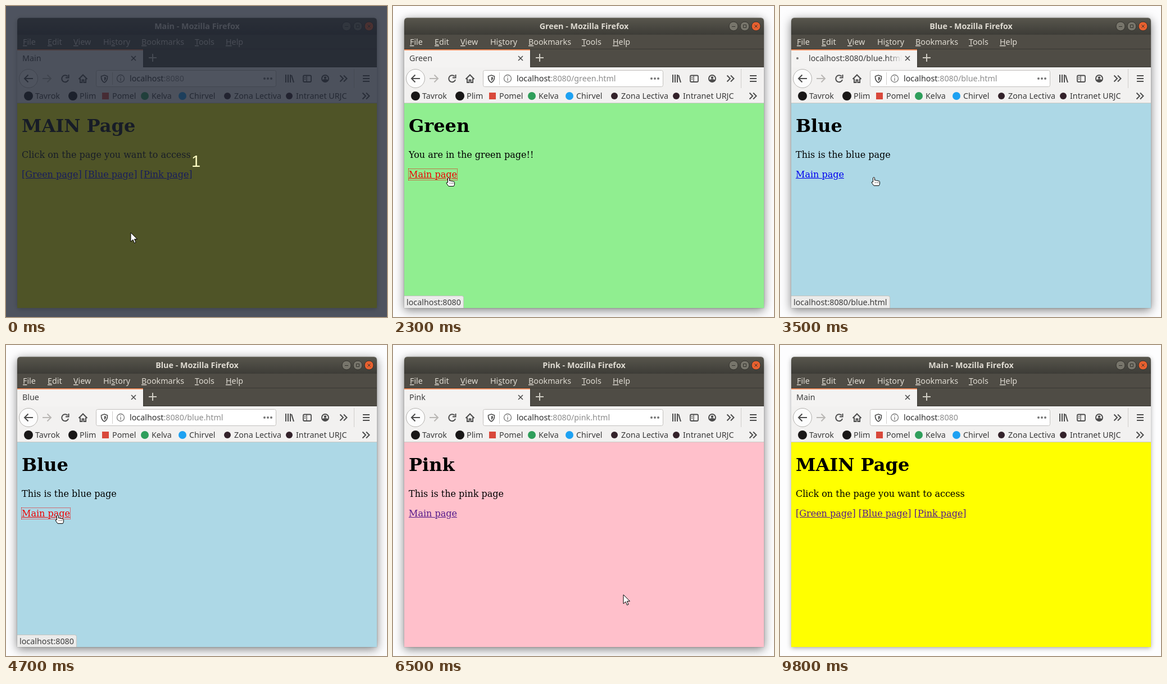
An HTML page for the animation above (9900 ms loop, 678 by 553 pixels).

```html
<!DOCTYPE html>
<html lang="en">
<head>
<meta charset="utf-8">
<title>Browser demo</title>
<style>
html, body { margin: 0; width: 100%; height: 100%; overflow: hidden; }
#stage { position: relative; width: 678px; height: 553px; overflow: hidden; background: #fdfdfe; }
#stage > * { position: absolute; }
#shadow { left: 20px; top: 21px; width: 640px; height: 516px; border-radius: 6px 6px 0 0;
  box-shadow: 0 4px 17px rgba(0,0,0,.5), 0 0 2px rgba(0,0,0,.35); }
#shadow.idle { box-shadow: 0 2px 8px rgba(0,0,0,.32), 0 0 1px rgba(0,0,0,.3); }
svg { left: 0; top: 0; }
svg text, #status { font: 14.3px "Noto Sans", "Open Sans", sans-serif; white-space: pre; }
#menu text { fill: #dfdbd2; }
#menu tspan { text-decoration: underline; }
#marks text { fill: #3a3a3a; }
#page { left: 20px; top: 173px; width: 640px; height: 364px; color: #000;
  font: 16px/19px "DejaVu Serif", serif; }
#page > * { position: absolute; left: 8px; margin: 0; white-space: pre; }
#page h1 { top: 22px; font: bold 32px/37px "DejaVu Serif", serif; }
#page .text { top: 82px; }
#page .links { top: 117px; }
a { color: #0000ee; text-decoration: underline; }
a.visited { color: #551a8b; }
a.active { color: #ee0000; outline: 1px dotted #ee0000; }
#status { left: 20px; top: 515px; height: 21px; line-height: 22px; padding: 0 4px;
  background: #ebebea; color: #3c3c3c; border: solid #c4c4c0; border-width: 1px 1px 0 0;
  border-radius: 0 4px 0 0; }
#dim { inset: 0; background: rgba(30,36,50,.78); }
#count { left: 330px; top: 260px; font: 29px/33px "Liberation Sans", Arial, sans-serif; color: #ffffc4; }
</style>
</head>
<body>
<div id="stage">
  <div id="shadow"></div>
  <svg width="678" height="553" viewBox="0 0 678 553">
    <defs>
      <linearGradient id="bar" x2="0" y2="1"><stop stop-color="#58564d"/><stop offset="1" stop-color="#3d3c37"/></linearGradient>
      <linearGradient id="fade"><stop stop-color="#f4f3f2" stop-opacity="0"/><stop offset="1" stop-color="#f4f3f2"/></linearGradient>
      <clipPath id="tabClip"><rect x="20" y="79" width="224" height="30"/></clipPath>
      <clipPath id="labelClip"><rect x="20" y="79" width="197" height="30"/></clipPath>
    </defs>
    <path d="M20 51V27q0-6 6-6H654q6 0 6 6V51Z" fill="url(#bar)"/>
    <path d="M26 21.5H654" stroke="#6a685e"/>
    <rect x="20" y="51" width="640" height="58" fill="#4f4c45"/>
    <path d="M20 76.5H660M244.500 77V109M244 108.500H660" stroke="#3a3833"/>
    <text id="title" x="340" y="41" text-anchor="middle" fill="#dfdbd2" style="font-weight:bold"></text>

    <g stroke="#33322d">
      <circle cx="606" cy="36" r="8" fill="#77756b"/>
      <circle cx="626" cy="36" r="8" fill="#77756b"/>
      <circle cx="646" cy="36" r="8" fill="#e8602f"/>
      <path d="M603 36.500H609M623.500 33.500H628.500V38.500H623.500ZM643.500 33.500L648.500 38.500M648.500 33.500L643.500 38.500" fill="none"/>
    </g>

    <g id="menu">
      <text x="30" y="69"><tspan>F</tspan>ile</text>
      <text x="74" y="69"><tspan>E</tspan>dit</text>
      <text x="120" y="69"><tspan>V</tspan>iew</text>
      <text x="173" y="69">Hi<tspan>s</tspan>tory</text>
      <text x="241" y="69"><tspan>B</tspan>ookmarks</text>
      <text x="336" y="69"><tspan>T</tspan>ools</text>
      <text x="391" y="69"><tspan>H</tspan>elp</text>
    </g>

    <rect x="20" y="77" width="224" height="32" fill="#f4f3f2"/>
    <rect x="20" y="77" width="224" height="2" fill="#ef8f5f"/>
    <circle id="burst" cx="28" cy="93" fill="#0a84ff" clip-path="url(#tabClip)"/>
    <circle id="dot" cx="31" cy="93" r="2" fill="#777"/>
    <g clip-path="url(#labelClip)"><text id="label" y="98" fill="#3c3c3c"></text></g>
    <rect id="labelFade" x="190" y="80" width="27" height="28" fill="url(#fade)"/>
    <path d="M223 89L231 97M231 89L223 97" stroke="#4a4a4a" stroke-width="1.6"/>
    <path d="M254 92H268M261 85V99" stroke="#cfccc3" stroke-width="2"/>

    <rect x="20" y="109" width="640" height="64" fill="#f2f1f0"/>
    <path d="M20 172.500H660" stroke="#c9c8c4"/>
    <circle cx="40" cy="129" r="16.500" fill="#fcfcfc" stroke="#b3b1ae"/>
    <rect x="160.500" y="114.500" width="320" height="29" rx="3" fill="#fff" stroke="#c2c0bd"/>
    <path d="M189.500 118V140M619.500 112V146" stroke="#d0cecb"/>
    <g fill="none" stroke="#4c4c4c" stroke-width="2">
      <path d="M48 129H33M39.500 122.500L33 129L39.500 135.500"/>
      <path d="M65 129H80M73.500 122.500L80 129L73.500 135.500" stroke="#b9b7b4"/>
      <path d="M109.500 125A6 6 0 1 0 111 131M111.500 122V127.500H106"/>
      <path d="M129.500 130L137 122.500L144.500 130M132 129V136H135.500V131.500H138.500V136H142V129"/>
      <path d="M175 123L180.500 125Q181 133 175 136Q169 133 169.500 125Z" stroke-width="1.600"/>
      <path d="M175 126V133Q178 131 178 127Z" fill="#4c4c4c" stroke="none"/>
      <g stroke="#777" stroke-width="1.300"><circle cx="204" cy="129" r="6.500"/><path d="M204 128V133M204 125V126.500"/></g>
      <path d="M498 122V136M502 122V136M506 122V136M508 123L512 136"/>
      <rect x="529" y="123.500" width="14" height="11.500" rx="2" stroke-width="1.800"/>
      <path d="M535 124V135M531 127H533M531 130H533" stroke-width="1.300"/>
      <circle cx="568" cy="129" r="6"/>
      <path d="M564 132Q568 130 572 132L568 135Z" fill="#4c4c4c"/>
      <circle cx="568" cy="127.500" r="2.200" fill="#4c4c4c" stroke="none"/>
      <path d="M594.500 123.500L600 129L594.500 134.500M601 123.500L606.500 129L601 134.500"/>
      <path d="M635 124H647M635 129H647M635 134H647"/>
      <path d="M634.500 154.500L640 160L634.500 165.500M641 154.500L646.500 160L641 165.500"/>
    </g>
    <g fill="#777"><circle cx="460" cy="129" r="2"/><circle cx="466" cy="129" r="2"/><circle cx="472" cy="129" r="2"/></g>
    <text x="220" y="134" fill="#2e2e2e">localhost<tspan id="path" fill="#8c8c8c"></tspan></text>

    <g id="marks">
      <circle cx="40" cy="160" r="8" fill="#191717"/><text x="52" y="165">Tavrok</text>
      <circle cx="119" cy="160" r="8" fill="#191717"/><text x="131" y="165">Plim</text>
      <rect x="171" y="154" width="12" height="12" fill="#d9483b"/><text x="189" y="165">Pomel</text>
      <circle cx="247" cy="160" r="7" fill="#2f9e5b"/><text x="259" y="165">Kelva</text>
      <circle cx="314" cy="160" r="7" fill="#1da1f2"/><text x="326" y="165">Chirvel</text>
      <circle cx="394" cy="160" r="6" fill="#33222a"/><text x="406" y="165">Zona Lectiva</text>
      <circle cx="504" cy="160" r="6" fill="#33222a"/><text x="516" y="165">Intranet URJC</text>
    </g>
  </svg>
  <div id="page"></div>
  <div id="status"></div>
  <div id="dim"></div>
  <div id="count">1</div>
  <svg width="678" height="553" viewBox="0 0 678 553">
    <g id="cursor" fill="#fff" stroke="#000" stroke-linejoin="round">
      <path id="arrow" d="M0 0V16L4 12.500L6.500 18.500L9 17.300L6.500 11.600H11.500Z"/>
      <g id="hand">
        <path d="M-1.500 9V1.500Q0-.5 1.500 1.500V6Q3 5 4.500 6.500Q6 5.500 7.500 7Q10 6.500 10.500 8.500V12Q10 14 9 15.500H0L-4 10Q-4 8-1.500 9Z"/>
        <path d="M2.500 9V11M5.500 9V11M8 9V11" stroke-width=".7"/>
      </g>
    </g>
  </svg>
</div>
<script>
const LOOP = 9900, STEP = 100;
const $ = id => document.getElementById(id);

const pages = {
  main: { name: 'Main', head: 'MAIN Page', text: 'Click on the page you want to access', color: '#ffff00', path: ':8080' },
  green: { name: 'Green', text: 'You are in the green page!!', color: '#90ee90' },
  blue: { name: 'Blue', text: 'This is the blue page', color: '#add8e6' },
  pink: { name: 'Pink', text: 'This is the pink page', color: '#ffc0cb' }
};
for (const id in pages) pages[id].path ??= `:8080/${id}.html`;

// Times below are in steps of 100 ms.
const visits = [
  { id: 'main', load: -9, ready: -9 },
  { id: 'green', load: 8, ready: 10, hover: 6, out: 9 },
  { id: 'main', load: 24, ready: 25, hover: 20, out: 25 },
  { id: 'blue', load: 35, ready: 36, hover: 31, out: 37 },
  { id: 'main', load: 48, ready: 49, hover: 44, out: 49 },
  { id: 'pink', load: 58, ready: 59, hover: 57, out: 60 },
  { id: 'main', load: 74, ready: 75, hover: 71, out: 75 }
];
const hands = [[6, 12], [20, 25], [31, 37], [44, 49], [56, 60], [71, 75]];
const track = [
  [0, 222, 403], [2, 222, 403], [3, 168, 366], [4, 168, 366], [6, 112, 306], [7, 111, 302],
  [10, 112, 300], [14, 150, 345], [20, 108, 309], [23, 99, 305], [28, 130, 330], [32, 175, 303],
  [35, 167, 304], [40, 130, 345], [44, 100, 306], [47, 92, 302], [51, 160, 330], [55, 250, 318],
  [57, 274, 297], [58, 275, 299], [64, 330, 390], [65, 410, 444], [66, 410, 444], [71, 105, 306],
  [73, 100, 301], [75, 137, 305], [77, 240, 336], [80, 492, 86], [82, 492, 86], [85, 436, 40], [99, 436, 40]
];

function pointAt(n) {
  const i = track.findIndex(p => p[0] > n);
  const [a, b] = [track[i - 1], track[i]];
  const k = (n - a[0]) / (b[0] - a[0]);
  return [a[1] + (b[1] - a[1]) * k, a[2] + (b[2] - a[2]) * k];
}

const show = (id, on) => $(id).style.display = on ? '' : 'none';

function link(text, visited, active) {
  return `<a class="${active ? 'active' : visited ? 'visited' : ''}">${text}</a>`;
}

function drawPage(n, visit, next) {
  const page = pages[visit.id];
  const clicked = next && n === next.load - 1 ? next.id : '';
  const links = visit.id === 'main'
    ? ['green', 'blue', 'pink'].map(id =>
        link(`[${pages[id].name} page]`, visits.some(v => v.id === id && v.load <= n), clicked === id)).join(' ')
    : link('Main page', n >= visit.ready, clicked);
  $('page').style.background = page.color;
  $('page').innerHTML = `<h1>${page.head || page.name}</h1><div class="text">${page.text}</div><div class="links">${links}</div>`;
  $('title').textContent = page.name + ' - Mozilla Firefox';
  $('path').textContent = page.path;
}

function drawTab(n, visit) {
  const page = pages[visit.id], loading = n < visit.ready;
  show('dot', loading);
  show('labelFade', loading);
  $('label').textContent = loading ? 'localhost' + page.path : page.name;
  $('label').setAttribute('x', loading ? 51 : 29);
  const t = Math.min(1, ((n - visit.ready) * STEP + 48) / 375);
  const k = loading ? 1 : 1 - (1 - t) ** 1.7;
  $('burst').setAttribute('r', 310 * k);
  $('burst').setAttribute('opacity', 0.4 * (1 - k));
}

function drawStatus(n) {
  const v = visits.find(v => n >= v.hover && n < v.out);
  show('status', v);
  if (!v) return;
  $('status').textContent = 'localhost' + pages[v.id].path;
  $('status').style.opacity = n === v.hover ? 0.22 : n === v.out - 1 ? 0.5 : 1;
}

function draw(n) {
  const i = visits.findLastIndex(v => v.load <= n);
  drawPage(n, visits[i], visits[i + 1]);
  drawTab(n, visits[i]);
  drawStatus(n);
  const hand = hands.some(([a, b]) => n >= a && n < b);
  show('hand', hand);
  show('arrow', !hand);
  show('cursor', n < 98);
  $('cursor').setAttribute('transform', `translate(${pointAt(n).map(Math.round)})`);
  show('dim', n === 0);
  show('count', n === 0);
  $('shadow').className = n === 0 || n >= 98 ? 'idle' : '';
}

let last = -1;
function tick() {
  const n = Math.floor(performance.now() % LOOP / STEP);
  if (n !== last) draw(last = n);
  requestAnimationFrame(tick);
}
tick();
</script>
</body>
</html>
```
